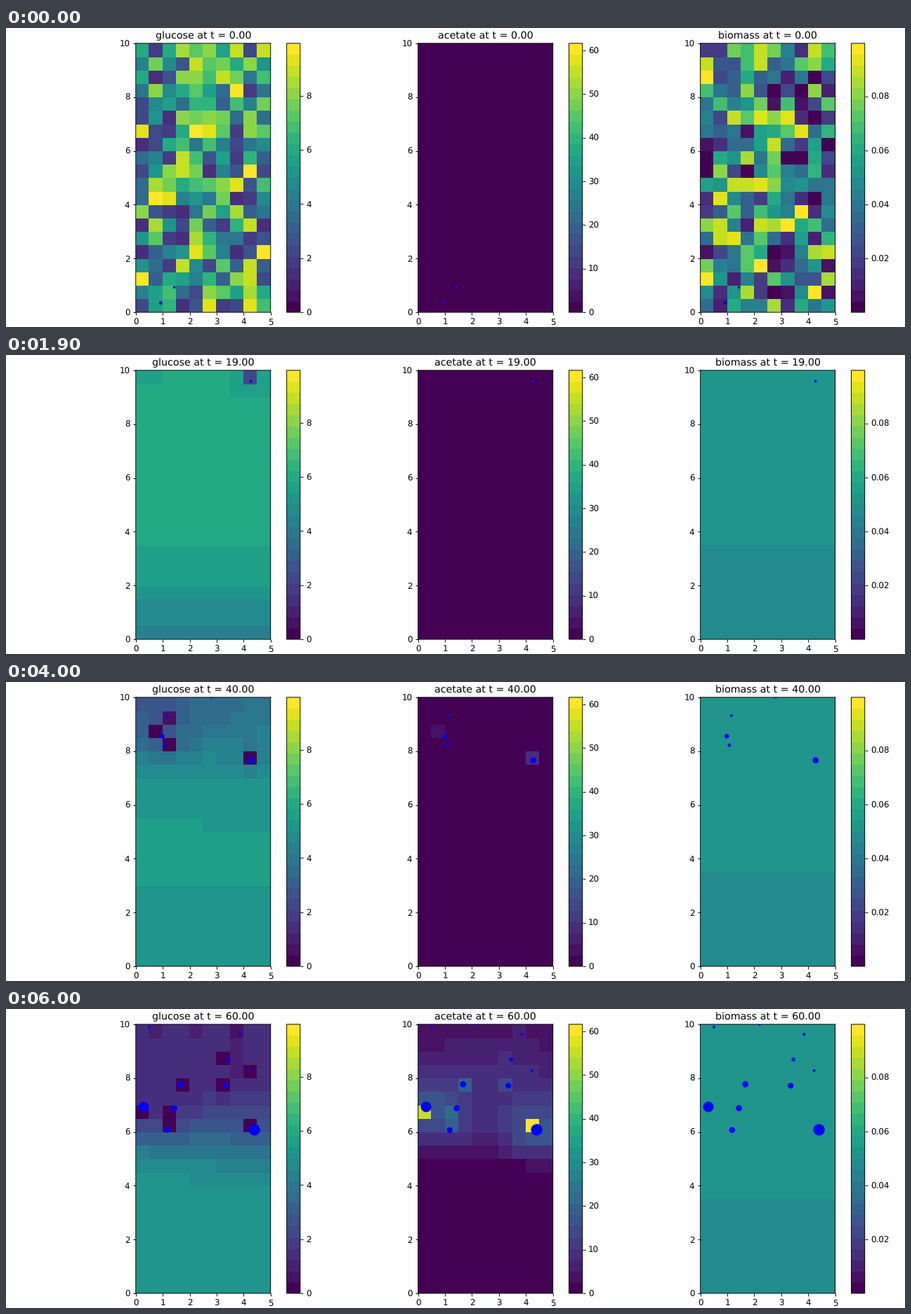
These frames come from a looping animation (1280x427 px, 6100 ms). A matplotlib script:

```python
import numpy as np
import matplotlib.pyplot as plt
from matplotlib.animation import FuncAnimation

W, H, DPI = 1280, 427, 80
S = 16 / 15  # font and line scale
FRAMES = 61
END = FRAMES - 1
NX, NY = 10, 20

plt.rcParams.update({
    "font.family": "DejaVu Sans", "font.size": 10 * S,
    "axes.titlesize": 12 * S, "axes.titlepad": 6 * S, "axes.linewidth": 0.8 * S,
    "xtick.major.size": 3.5 * S, "ytick.major.size": 3.5 * S,
    "xtick.major.width": 0.8 * S, "ytick.major.width": 0.8 * S,
    "xtick.major.pad": 3.5 * S, "ytick.major.pad": 3.5 * S,
    "path.snap": False, "text.hinting": "none",
})

cmap = plt.get_cmap("viridis", 24)
X, Y = np.meshgrid((np.arange(NX) + 0.5) / 2, (np.arange(NY) + 0.5) / 2)


def ramp(v):
    return np.clip(v, 0, 1)


def bell(v):
    return np.exp(-v ** 2)


def cosines(n, length):
    k = np.arange(n)
    c = np.cos(np.pi * np.outer(k, k + 0.5) / n) * np.sqrt(2 / n)
    c[0] /= np.sqrt(2)
    return c, (np.pi * k / length) ** 2


CX, LX = cosines(NX, 5)
CY, LY = cosines(NY, 10)
rng = np.random.default_rng(11)
glucose_start = rng.uniform(0.12, 1, (NY, NX))
biomass_start = rng.uniform(0, 1, (NY, NX))


def settle(t, start, base):
    """Diffuse the random start towards the smooth base field."""
    coef = CY @ (start - base) @ CX.T * np.exp(-0.2 * t * (LY[:, None] + LX))
    return base + CY.T @ coef @ CX * ramp(1 - t / 8)


def glucose_base(t):
    plateau = 0.065 * ramp((Y - 1) / 2.5) * ramp((46 - t) / 27)
    floor = 0.1 * np.exp(-Y / 1.5) * bell((t - 17) / 6)
    rich = 0.53 + plateau - floor
    # Depleted layer that sinks from the top
    poor = 0.13 + 0.4 * bell((t - 20) / 20) + 0.02 * X * ramp((END - t) / 14)
    front = 8.7 - 0.112 * (t - 34)
    depth = 1 / (1 + np.exp((front - Y) / (0.5 + 0.06 * X)))
    return rich + (poor - rich) * depth


def biomass_base():
    return 0.53 - 0.07 * ramp((4.25 - Y) / 2)


def acetate_base(t):
    level = 0.1 * ramp((t - 34) / 26) ** 1.5
    low = 7 - 0.165 * (t - 46)
    return level * ramp((Y - low) / 1.2) * (1 - 0.4 * ramp((Y - 8) / 2))


# Cells entering at the top: entry time, entry x, last x, last y, last radius
entering = [
    (16, 4.25, 4.40, 6.08, 8.2),
    (26, 1.03, 0.30, 6.93, 7.5),
    (27, 1.07, 1.18, 6.07, 4.2),
    (36, 1.15, 1.43, 6.88, 4.4),
    (41, 1.88, 1.67, 7.77, 4.4),
    (40, 2.80, 3.35, 7.72, 4.1),
    (45, 3.35, 3.45, 8.69, 2.8),
    (50, 4.47, 4.22, 8.28, 2.0),
    (52, 4.94, 5.60, 9.25, 2.4),
    (57, 3.85, 3.85, 9.63, 2.2),
    (59, 0.50, 0.50, 9.90, 2.0),
    (59, 2.20, 2.20, 10.0, 1.8),
]


def alive(t):
    """Return (x, y, radius, age) for each cell present at time t."""
    out = []
    for x, y, r, drift in [(0.93, 0.35, 2.4, 0), (1.43, 0.93, 1.9, 0.046)]:
        out.append((x + drift * t, y - 0.07 * t, r + 0.04 * t, t))
    for t0, x0, x1, y1, r1 in entering:
        if t >= t0:
            u = (t - t0) / (END - t0)
            out.append((x0 + (x1 - x0) * u ** 3, 10 + (y1 - 10) * u ** 0.85,
                        1.8 + (r1 - 1.8) * u ** 1.5, t - t0))
    return [c for c in out if c[0] < 5 and c[1] >= 0]


def fields(t, now):
    glucose = settle(t, glucose_start, glucose_base(t))
    biomass = settle(t, biomass_start, biomass_base())
    acetate = acetate_base(t)
    for x, y, r, age in now:
        dist = np.hypot(X - x, Y - y)
        hunger, output = ramp(age / 5), (r / 8.2) ** 3
        here = min(int(y * 2), NY - 1), int(x * 2)
        glucose *= 1 - 0.12 * hunger * bell(dist / 0.7)
        glucose[here] *= 1 - hunger
        acetate += 0.2 * output * bell(dist / 1.13)
        acetate[here] += 0.8 * output
    return [ramp(f) for f in (glucose, acetate, biomass)]


fig = plt.figure(figsize=(W / DPI, H / DPI), dpi=DPI, facecolor="white")


def place(x, w):
    return fig.add_axes([x / W, 20.95 / H, w / W, 384.2 / H])


panels = []
for i, (name, top, step) in enumerate([
    ("glucose", 9.94, 2), ("acetate", 61.6, 10), ("biomass", 0.0997, 0.02),
]):
    left = 184.75 + 401.93 * i
    ax = place(left, 192)
    mesh = ax.pcolormesh(np.arange(NX + 1) / 2, np.arange(NY + 1) / 2,
                         np.zeros((NY, NX)), cmap=cmap, vmin=0, vmax=top)
    dots = ax.scatter([], [], color="blue", linewidths=0)
    ax.set(xlim=(0, 5), ylim=(0, 10), xticks=range(6), yticks=range(0, 11, 2))
    first = step if name == "biomass" else 0
    fig.colorbar(mesh, cax=place(left + 214.9, 19.2), ticks=np.arange(first, top, step))
    panels.append((name, top, ax.set_title(""), mesh, dots))


def update(t):
    now = alive(t)
    spots = np.array([c[:2] for c in now]).reshape(-1, 2)
    sizes = np.array([(2 * c[2] * 72 / DPI) ** 2 for c in now])
    for (name, top, title, mesh, dots), field in zip(panels, fields(t, now)):
        title.set_text(f"{name} at t = {t:.2f}")
        mesh.set_array(field * top)
        dots.set_offsets(spots)
        dots.set_sizes(sizes)
    return []


anim = FuncAnimation(fig, update, frames=FRAMES, interval=100, repeat=True,
                     repeat_delay=0, blit=False)
plt.show()
```
